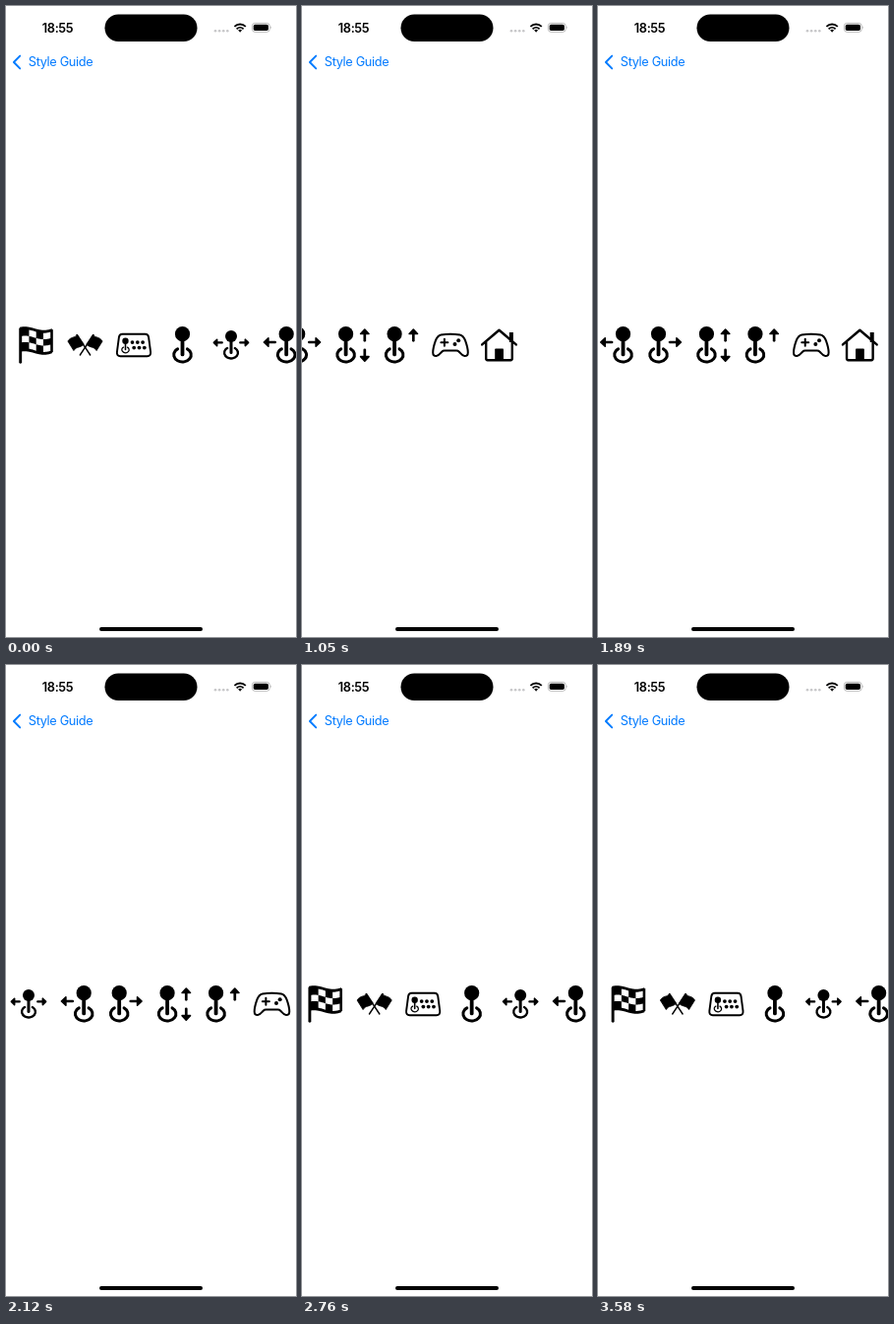
These frames come from a looping animation (295x640 px, 4910 ms). An HTML page with a canvas:

```html
<!DOCTYPE html>
<html lang="en">
<head>
<meta charset="utf-8">
<title>Style Guide</title>
<style>
  html, body { margin: 0; width: 100%; height: 100%; overflow: hidden; background: #fff; }
  canvas, svg { position: absolute; left: 0; top: 0; width: 295px; height: 640px; display: block; }
  text { font-family: Inter, "Liberation Sans", sans-serif; font-size: 12.75px; letter-spacing: -0.35px; }
</style>
</head>
<body>
<canvas id="row"></canvas>
<svg viewBox="0 0 295 640">
  <text x="36.8" y="26.6" font-weight="600">18:55</text>
  <rect x="100.5" y="8.5" width="94" height="27.5" rx="13.75"/>
  <g fill="#c6c6c8">
    <circle cx="213" cy="25.2" r="1.3"/><circle cx="217.1" cy="25.2" r="1.3"/>
    <circle cx="221.2" cy="25.2" r="1.3"/><circle cx="225.3" cy="25.2" r="1.3"/>
  </g>
  <g fill="none" stroke="#000" stroke-width="1.8">
    <path d="M232.4 20.9A8 8 0 0 1 243.8 20.9"/>
    <path d="M234.6 23.3A5 5 0 0 1 241.6 23.3"/>
  </g>
  <path d="M238.1 26.7L236.1 24.6A2.9 2.9 0 0 1 240.1 24.6Z"/>
  <rect x="250.4" y="17.4" width="17.8" height="8.9" rx="2.8" fill="none" stroke="#a8a8a8" stroke-width=".8"/>
  <rect x="251.7" y="18.7" width="15.2" height="6.3" rx="1.7"/>
  <path d="M269.2 20.3Q270.6 21.8 269.2 23.3Z" fill="#a8a8a8"/>
  <g fill="#007aff">
    <path d="M14.2 50.6L7.9 57L14.2 63.4" fill="none" stroke="#007aff" stroke-width="1.9" stroke-linecap="round" stroke-linejoin="round"/>
    <text x="22.8" y="61.4">Style Guide</text>
  </g>
  <rect x="95" y="630" width="105" height="4" rx="2"/>
</svg>
<script>
const W = 295, H = 640, LOOP = 4910;
const FIRST = 31, PITCH = 49.5, MID = 344, END = -259.5;
const canvas = document.getElementById('row');
const c = canvas.getContext('2d');
const dpr = window.devicePixelRatio || 1;
canvas.width = W * dpr;
canvas.height = H * dpr;

function at(x, y, scale, draw) {
  c.save();
  c.translate(x, y);
  c.scale(scale, scale);
  draw();
  c.restore();
}

function line(width, ...pts) {
  c.lineWidth = width;
  c.beginPath();
  for (let i = 0; i < pts.length; i += 2) c.lineTo(pts[i], pts[i + 1]);
  c.stroke();
}

function disc(x, y, r) {
  c.beginPath();
  c.arc(x, y, r, 0, 7);
  c.fill();
}

function outline(width, d) {
  c.lineWidth = width;
  c.stroke(new Path2D(d));
}

// Arrow with its tip at (x, y); angle 0 points right.
function arrow(x, y, angle, len, size) {
  c.save();
  c.translate(x, y);
  c.rotate(angle * Math.PI / 180);
  const h = size / 2 - 0.8, back = 0.8 - size * 0.62;
  c.lineWidth = 1.6;
  c.beginPath();
  c.moveTo(-0.9, 0);
  c.lineTo(back, -h);
  c.lineTo(back, h);
  c.closePath();
  c.fill();
  c.stroke();
  const w = size * 0.27;
  line(w, -len + w / 2, 0, back, 0);
  c.restore();
}

function stick(x = 0, scale = 1) {
  at(x, 0, scale, () => {
    disc(0, -11.3, 7.6);
    line(3.8, 0, -10, 0, 9.4);
    c.lineWidth = 3;
    c.beginPath();
    c.ellipse(0, 9.8, 8.8, 7.2, 0, -0.98, Math.PI + 0.98);
    c.stroke();
  });
}

function flag() {
  const wave = x => 1.8 * Math.sin((x + 2.1) * Math.PI / 19);
  const patch = (x0, x1, y0, y1) => {
    c.beginPath();
    for (let i = 0; i <= 10; i++) {
      const x = x0 + (x1 - x0) * i / 10;
      c.lineTo(x, y0 + wave(x));
    }
    for (let i = 10; i >= 0; i--) {
      const x = x0 + (x1 - x0) * i / 10;
      c.lineTo(x, y1 + wave(x));
    }
    c.closePath();
    c.fill();
  };
  line(2.9, -16.3, -16.4, -16.3, 17.2);
  patch(-17, 15.8, -17, 8);
  c.lineWidth = 2;
  patch(15, 16.8, -16, 7);
  c.fillStyle = '#fff';
  const w = 7.25, h = 6.4;
  for (let col = 0; col < 4; col++) {
    for (let r = 0; r < 3; r++) {
      if ((col + r) % 2 === 0) continue;
      const x = -14.8 + col * w, y = -14.1 + r * h;
      patch(x, x + w, y, y + h);
    }
  }
  c.fillStyle = '#000';
}

function crossed() {
  const cloth = new Path2D('M-8.2-10.6C-10.6-6.8-14.6-9-17.6-4L-11.6 5.6C-9 1-5 3-1.6-.5Z');
  for (const side of [1, -1]) {
    c.save();
    c.scale(side, 1);
    c.lineWidth = 0.8;
    c.fill(cloth);
    c.stroke(cloth);
    line(1.4, -8.4, -10.4, 5.2, 10);
    c.restore();
  }
}

function panel() {
  outline(1.9, 'M-11.5-11.2H11.5Q14.6-11.2 15.1-8L17.1 7Q17.5 11.2 13.6 11.2H-13.6Q-17.5 11.2-17.1 7L-15.1-8Q-14.6-11.2-11.5-11.2Z');
  at(-8.5, 0.5, 0.42, () => stick());
  for (let i = 0; i < 3; i++) {
    disc(-1.5 + 5.3 * i, -2.9, 1.9);
    disc(0.2 + 5.3 * i, 2.6, 1.9);
  }
}

function both() {
  stick(0, 0.79);
  arrow(-18.5, -2.6, 180, 10.4, 8);
  arrow(18.5, -2.6, 0, 10.4, 8);
}

function toLeft() {
  stick(6.7);
  arrow(-17, -3, 180, 13.6, 10);
}

function toRight() {
  stick(-6.8);
  arrow(17, -3, 0, 13.6, 10);
}

function toUp() {
  stick(-7.4);
  arrow(11.8, -16.9, -90, 13.6, 10);
}

function upDown() {
  toUp();
  arrow(11.8, 17, 90, 13.6, 10);
}

function pad() {
  outline(2, 'M-9.5-10.6C-4-11.4 4-11.4 9.5-10.6C13-10 14-7.6 15.2-4.4C16.6-.5 17.8 4 17.8 7.4C17.8 10.2 16.2 11 14.4 11C12 11 10.6 8.6 8.8 6.7C8 5.9 7.3 5.6 6 5.6H-6C-7.3 5.6-8 5.9-8.8 6.7C-10.6 8.6-12 11-14.4 11C-16.2 11-17.8 10.2-17.8 7.4C-17.8 4-16.6-.5-15.2-4.4C-14-7.6-13-10-9.5-10.6Z');
  line(2, -9.6, -2.8, -2.6, -2.8);
  line(2, -6.1, -6.3, -6.1, 0.7);
  disc(8.2, -4.8, 2);
  disc(4.5, -1.1, 2);
}

function house() {
  line(2.5, -17.3, -0.6, 0, -15.3, 17.3, -0.6);
  outline(2.4, 'M-13.3-3V13.6Q-13.3 15.2-11.7 15.2H11.7Q13.3 15.2 13.3 13.6V-3');
  c.fillRect(10.4, -13, 4, 10);
  c.beginPath();
  c.roundRect(-4.3, 3.4, 8.8, 12, 0.8);
  c.fill();
}

const icons = [flag, crossed, panel, () => stick(), both, toLeft, toRight, upDown, toUp, pad, house];

// Moments at which the screen refreshes.
const ticks = [0, 810, 930, 1050, 1150, 1250, 1350, 1450, 1550, 1670, 1890, 2010, 2120, 2230, 2340,
  2460, 2560, 2660, 2760, 2920, 3020, 3120, 3220, 3330, 3440, 3580];

function scroll(t) {
  if (t < 810) return 0;
  if (t < 1050) return (END - 66) * Math.sin((t - 790) / 260 * Math.PI / 2) ** 1.4;
  if (t < 1960) { // bounce back from the far edge
    const s = 9.7 * (t - 1050) / 1000;
    return END - 66 * (1 + s) * Math.exp(-s);
  }
  if (t < 2340) { // swipe back
    const p = (t - 1960) / 380;
    return END + 183 * p * p * (3 - 2 * p) + 161 * p * p * (p - 1);
  }
  return 0.5 - 77 * Math.exp(-5.6 * (t - 2340) / 1000);
}

function draw(t) {
  const x = scroll(ticks.findLast(k => k <= t));
  c.setTransform(dpr, 0, 0, dpr, 0, 0);
  c.clearRect(0, 0, W, H);
  c.fillStyle = c.strokeStyle = '#000';
  c.lineCap = c.lineJoin = 'round';
  icons.forEach((icon, i) => at(FIRST + PITCH * i + x, MID, 1, icon));
}

const start = performance.now();
function frame() {
  draw((performance.now() - start) % LOOP);
  requestAnimationFrame(frame);
}
frame();
</script>
</body>
</html>
```
